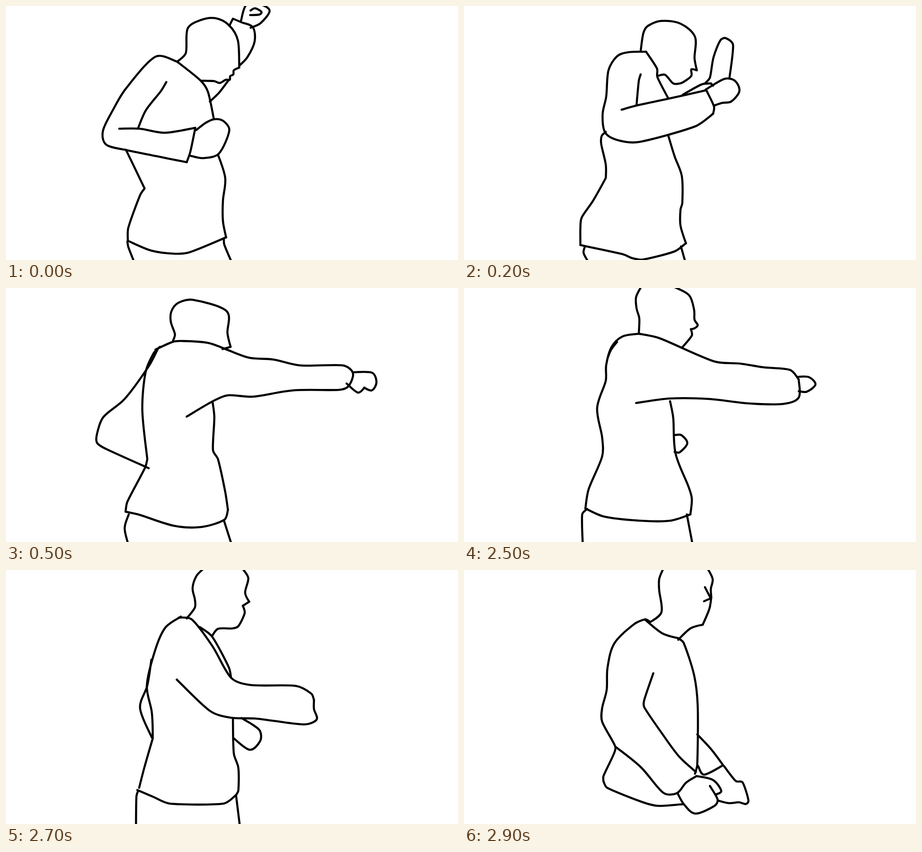
Recreate the animation shown at these times as an HTML page. Size 998 px wide and 561 px high, loop 3000 ms.

```html
<!DOCTYPE html>
<html lang="en">
<head>
<meta charset="utf-8">
<title>Punch</title>
<style>
html, body { margin: 0; width: 100%; height: 100%; overflow: hidden; background: #fff; }
#stage { width: 998px; height: 561px; overflow: hidden; }
#strip { animation: flip 3s step-end infinite; }
svg { display: block; width: 998px; height: 561px; overflow: hidden; }
path, polyline { fill: none; stroke: #000; stroke-width: 4.6; stroke-linecap: round; stroke-linejoin: round; }
@keyframes flip {
  0% { transform: translateY(0); }
  3.333% { transform: translateY(-561px); }
  6.666% { transform: translateY(-1122px); }
  10% { transform: translateY(-1683px); }
  13.333% { transform: translateY(-2244px); }
  16.666% { transform: translateY(-2805px); }
  83.333% { transform: translateY(-3366px); }
  86.666% { transform: translateY(-3927px); }
  90% { transform: translateY(-4488px); }
  93.333% { transform: translateY(-5049px); }
  96.666% { transform: translateY(-5610px); }
}
</style>
</head>
<body>
<div id="stage"><div id="strip">

<svg>
<polyline class="head" points="378,123 397,104 401,50 430,31 463,27 493,43 512,76 515,136"/>
<polyline class="face" points="515,136 503,142 502,151 495,155 494,163 485,163 472,170 460,166 433,165"/>
<polyline class="far" points="493,44 501,28 501,28 520,36 545,47 549,78 533,113 515,132"/>
<polyline class="farhand" points="519,32 531,-3 563,-3 582,11 562,38 540,48"/>
<polyline class="thumb" points="540,10 550,5 564,13 559,19 539,20"/>
<polyline class="farlow" points="492,163 470,192 450,211"/>
<polyline class="sleeve" points="378,123 330,112 265,182 237,228 214,276 221,306 265,318 399,345"/>
<polyline class="cuff" points="399,345 407,322 418,269"/>
<polyline class="fore" points="418,269 350,280 295,271 250,271"/>
<polyline class="inner" points="354,168 342,188 309,230 292,269"/>
<polyline class="chest" points="378,123 430,165 446,190 459,250"/>
<polyline class="hand" points="420,274 441,258 460,250 480,254 493,275 470,326 435,336 408,331"/>
<polyline class="back" points="265,318 282,353 306,403 306,403 296,418 270,490 269,518"/>
<polyline class="front" points="468,328 484,380 479,430 479,475 486,511"/>
<polyline class="hem" points="270,519 320,540 370,547 405,544 486,511"/>
<polyline class="leg1" points="268,520 270,532 282,563"/>
<polyline class="leg2" points="481,513 482,527 497,563"/>
</svg>

<svg>
<polyline class="head" points="390,100 396,60 406,44 435,33 478,39 510,68 509,115 514,142"/>
<polyline class="face" points="514,142 502,140 502,154 489,165 477,171 462,171 444,152 429,154"/>
<polyline class="far" points="545,171 550,176"/>
<polyline class="farhand" points="533,170 543,158 551,113 566,76 578,71 594,86 586,160"/>
<polyline class="farlow" points="545,171 525,173 483,196"/>
<polyline class="sleeve" points="402,101 364,102 338,111 319,142 314,200 306,240 312,280 342,297 388,300 510,266 550,238"/>
<polyline class="cuff" points="550,238 552,222 535,186"/>
<polyline class="fore" points="535,186 450,205 380,220 348,229"/>
<polyline class="inner" points="390,151 386,165 381,218"/>
<polyline class="chest" points="402,101 426,138 427,157 451,204"/>
<polyline class="hand" points="533,185 575,161 598,165 608,188 590,211 570,214 552,220"/>
<polyline class="back" points="313,278 304,287 303,305 313,350 313,380 313,380 285,430 260,467 257,490 257,528"/>
<polyline class="front" points="451,286 465,332 481,376 482,435 478,450 478,485 490,524"/>
<polyline class="hem" points="257,528 350,548 372,557 395,560 465,542 490,524"/>
<polyline class="leg1" points="267,531 264,545 273,563"/>
<polyline class="leg2" points="479,531 488,563"/>
</svg>

<svg>
<polyline class="head" points="373,102 380,95 381,60 404,30 438,22 499,50 504,70 501,110 507,133 507,133 490,145"/>
<polyline class="chin" points="488,134 495,142"/>
<polyline class="neck" points="372,103 395,105 455,123 491,146"/>
<polyline class="arm" points="493,142 630,139 700,149 716,165 710,192 680,205 530,219 470,238 419,252"/>
<polyline class="hand" points="713,157 765,163 774,170 774,187 757,210 733,188 707,187"/>
<polyline class="back" points="372,101 358,106 303,162 296,200 296,228 304,258 301,310 301,387"/>
<polyline class="elbow" points="301,310 275,345 276,372 304,386"/>
<polyline class="waist" points="301,387 282,410 269,460 264,513"/>
<polyline class="hem" points="264,513 275,520 357,527 395,545 425,544 470,524 484,505 484,488"/>
<polyline class="front" points="458,243 449,315 457,360 476,385 476,437 484,488"/>
<polyline class="fist" points="450,316 487,311 499,333 482,361 472,361 452,350"/>
<polyline class="leg1" points="262,514 261,563"/>
<polyline class="leg2" points="480,516 491,563"/>
</svg>

<svg>
<polyline class="head" points="369,116 373,102 364,75 365,52 380,33 412,26 487,51 489,100 496,130 496,130 478,135"/>
<polyline class="neck" points="330,136 368,119 388,117 445,121 490,137"/>
<polyline class="arm" points="490,137 537,154 590,158 650,171 744,171 766,188 756,217 735,225 635,226 545,240 490,237 455,251 399,284"/>
<polyline class="hand" points="765,186 808,187 818,208 808,226 791,220 791,220 777,231 752,211"/>
<polyline class="back" points="340,130 326,144 308,187 301,270 312,378"/>
<polyline class="waist" points="312,378 307,397 268,472 264,494"/>
<polyline class="elbow" points="335,135 315,173 262,245 215,285 201,322 201,342 220,355 315,398"/>
<polyline class="hem" points="264,494 295,501 370,525 430,528 482,512 490,490"/>
<polyline class="front" points="456,251 460,285 457,358 468,378 484,450 490,490"/>
<polyline class="leg1" points="271,500 262,530 269,563"/>
<polyline class="leg2" points="481,513 497,563"/>
</svg>

<svg>
<polyline class="head" points="386,100 387,67 381,45 380,20 392,-4"/>
<polyline class="crown" points="465,-2 497,16 508,48 509,70 516,82 509,89 501,91"/>
<polyline class="jaw" points="501,91 503,105 482,131"/>
<polyline class="back" points="386,101 350,107 326,130 314,170 313,205 294,265 305,330 305,372 275,445 268,487"/>
<polyline class="fold" points="338,119 325,136 318,152"/>
<polyline class="top" points="386,101 432,111 552,162 610,167 660,175 720,181 739,202"/>
<polyline class="under" points="739,202 739,242 705,256 630,255 540,245 455,244 380,254"/>
<polyline class="hand" points="739,196 762,197 776,213 757,229 739,228"/>
<polyline class="fist" points="465,325 480,325 493,343 476,363 465,362"/>
<polyline class="front" points="455,250 462,287 467,365 495,437 503,465 500,499"/>
<polyline class="hem" points="268,487 310,505 390,514 455,514 500,500"/>
<polyline class="leg1" points="272,488 261,500 262,563"/>
<polyline class="leg2" points="492,500 504,563"/>
</svg>

<svg>
<polyline class="head" points="399,107 417,83 417,65 412,40 420,14 435,-2"/>
<polyline class="crown" points="523,-2 535,18 528,50 537,70 537,70 523,79"/>
<polyline class="jaw" points="523,79 527,95 513,124 500,129 468,130 455,146"/>
<polyline class="back" points="386,103 352,127 330,175 311,255 322,315 324,372 324,372 305,438 294,481"/>
<polyline class="elbow" points="321,198 312,255 296,305 322,370"/>
<polyline class="top" points="382,105 410,109 455,167 497,238 540,254 640,256 674,273 680,287"/>
<polyline class="collar" points="428,126 455,147 492,215 497,238"/>
<polyline class="under" points="680,287 680,307 686,330 660,341 590,333 550,328 495,326 450,311 377,242"/>
<polyline class="fist" points="520,327 545,342 561,356 561,378 538,397 502,371"/>
<polyline class="front" points="501,328 503,405 513,437 513,487 508,497"/>
<polyline class="hem" points="290,486 325,501 362,516 480,516 508,497"/>
<polyline class="leg1" points="292,487 288,500 287,563"/>
<polyline class="leg2" points="508,498 516,563"/>
</svg>

<svg>
<polyline class="head" points="410,116 436,93 431,45 431,20 440,-3"/>
<polyline class="crown" points="538,-3 549,20 545,42 546,60"/>
<polyline class="jaw" points="546,60 542,85 527,121 527,121 500,129 473,154"/>
<polyline class="brow" points="532,38 545,63"/>
<polyline class="nose" points="530,69 546,62"/>
<polyline class="neck" points="399,109 438,140 474,151"/>
<polyline class="front" points="474,151 485,161 508,232 516,300 515,430 510,450"/>
<polyline class="back" points="410,114 400,109 375,120 332,162 317,215 315,265 305,305 305,335 334,390 330,408 308,455 308,467"/>
<polyline class="under" points="512,456 490,470 470,493 440,492 390,435 334,390"/>
<polyline class="top" points="418,228 398,287 398,303 440,365 475,412 512,446"/>
<polyline class="far" points="515,363 545,395 572,431 572,431 530,452 517,433"/>
<polyline class="fist" points="574,433 600,466 615,469 628,509 622,517 607,513 585,515 560,509"/>
<polyline class="hand" points="471,492 486,518 511,538 553,521 560,507 543,477"/>
<polyline class="fingers" points="513,455 550,464 568,488 556,496"/>
<polyline class="hem" points="308,467 316,481 395,513 430,521 485,517"/>
</svg>

</div></div>
<script>
const NS = "http://www.w3.org/2000/svg";
const make = (tag, attrs) => {
  const el = document.createElementNS(NS, tag);
  for (const k in attrs) el.setAttribute(k, attrs[k]);
  return el;
};

// Smooth spline through the points; a doubled point makes a sharp corner.
function curve(points) {
  const p = points.split(" ").map(s => s.split(",").map(Number));
  const handle = (i, len) => {
    const a = p[Math.max(i - 1, 0)], b = p[Math.min(i + 1, p.length - 1)];
    const sharp = [a, b].some(q => q !== p[i] && "" + q === "" + p[i]);
    const dx = b[0] - a[0], dy = b[1] - a[1];
    const k = sharp ? 0 : Math.min(1 / 6, len / 3 / Math.hypot(dx, dy));
    return [dx * k, dy * k];
  };
  let d = "M" + p[0];
  for (let i = 1; i < p.length; i++) {
    const [x0, y0] = p[i - 1], [x1, y1] = p[i];
    const len = Math.hypot(x1 - x0, y1 - y0);
    const a = handle(i - 1, len), b = handle(i, len);
    d += `C${x0 + a[0]},${y0 + a[1]} ${x1 - b[0]},${y1 - b[1]} ${x1},${y1}`;
  }
  return d;
}

// Pose halfway between two others, for the parts that both have.
function between(a, b) {
  const svg = make("svg"), steps = 40;
  for (const s of a.children) {
    const name = s.getAttribute("class"), t = b.querySelector("." + name);
    if (!t) continue;
    const ls = s.getTotalLength(), lt = t.getTotalLength();
    const points = Array.from({ length: steps + 1 }, (_, i) => {
      const u = s.getPointAtLength(ls * i / steps), v = t.getPointAtLength(lt * i / steps);
      return (u.x + v.x) / 2 + "," + (u.y + v.y) / 2;
    });
    svg.append(make("polyline", { points: points.join(" ") }));
  }
  a.after(svg);
}

const poses = [...document.querySelectorAll("svg")];
document.querySelectorAll("polyline").forEach(line =>
  line.replaceWith(make("path", { class: line.getAttribute("class"), d: curve(line.getAttribute("points")) })));
[0, 2, 4, 5].forEach(i => between(poses[i], poses[i + 1]));
</script>
</body>
</html>
```
